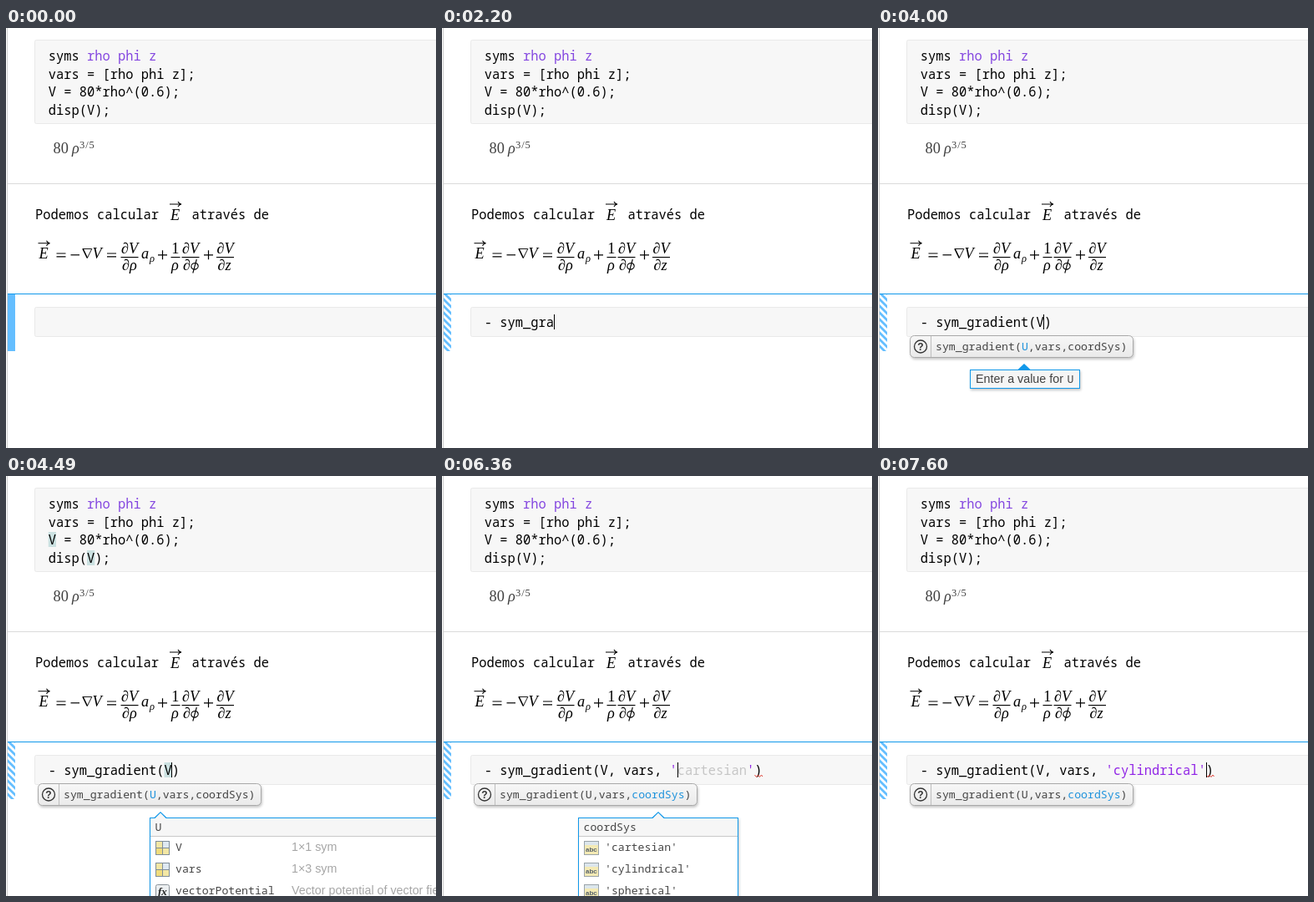
Write an HTML page that moves like this. It is 515 by 503 pixels and loops after 8 s.

```html
<!DOCTYPE html>
<html lang="pt">
<head>
<meta charset="utf-8">
<title>Notebook</title>
<style>
html, body { margin: 0; width: 100%; height: 100%; overflow: hidden; background: #fff; }
svg { display: block; width: 100%; height: 100%; }
text { white-space: pre; }
.code { font: 15.417px "Noto Sans Mono", "DejaVu Sans Mono", monospace; fill: #000; }
.small { font: 13.2px "Noto Sans Mono", "DejaVu Sans Mono", monospace; fill: #454545; }
.ui { font: 14.3px "Liberation Sans", Arial, sans-serif; fill: #404040; }
.math { font: italic 18.3px "Liberation Serif", "Times New Roman", serif; }
.up { font-style: normal; }
.sub { font-size: 12.5px; }
.dim { fill: #a6a6a6; }
.sym { fill: #8447e0; }
.str { fill: #9126e6; }
.ghost { fill: #c6c6c6; }
.arg { fill: #1f93dc; }
.shadow { filter: drop-shadow(1px 2px 1.5px rgba(0,0,0,.22)); }
.mark { mix-blend-mode: multiply; }
</style>
</head>
<body>
<svg viewBox="0 0 515 503" xmlns="http://www.w3.org/2000/svg">
  <defs>
    <pattern id="hatch" width="5.657" height="5.657" patternUnits="userSpaceOnUse" patternTransform="translate(2 319) rotate(45)">
      <rect width="5.657" height="5.657" fill="#fff"/><rect y="2.828" width="5.657" height="2.829" fill="#64beff"/>
    </pattern>
    <linearGradient id="tip" x2="0" y2="1"><stop stop-color="#f7f7f7"/><stop offset="1" stop-color="#eaeaea"/></linearGradient>
  </defs>
  <g id="page"></g>
  <g id="live"></g>
</svg>
<script>
const LOOP = 8000, X0 = 50.75, ADV = 9.25, BLUE = '#1098ea', INK = '#000';
const col = n => X0 + n * ADV;
const $ = id => document.getElementById(id);
const text = (x, y, cls, s) => `<text x="${x}" y="${y}" class="${cls}">${s}</text>`;
const span = (cls, s) => s ? `<tspan class="${cls}">${s}</tspan>` : '';
const rect = (x, y, w, h, fill, more = '') =>
  `<rect x="${x}" y="${y}" width="${w}" height="${h}" fill="${fill}" ${more}/>`;
const path = (d, stroke, w = 1, fill = 'none') =>
  `<path d="${d}" stroke="${stroke}" stroke-width="${w}" fill="${fill}"/>`;

// ---- static page ----
const cell = (y, h) => rect(34.5, y + .5, 500, h, '#f7f7f7', 'rx="2" stroke="#e9e9e9"');
const vec = (x, y) => text(x, y, 'math', 'E') +
  path(`M${x - 1} ${y - 18.5}h14m-4 -3q1 2.4 4 3q-3 .6 -4 3`, INK, 1.1);
const bar = (x, w) => rect(x, 274, w, 1.1, INK);
const equals = x => path(`M${x} 270h11m0 3.8h-11`, INK, 1.2);
const minus = x => path(`M${x} 271.8h10.5`, INK, 1.2);
const plus = x => path(`M${x} 271.8h11m-5.5 -5.5v11`, INK, 1.2);
const nabla = path('M91.8 264.5h11l-5.5 11z', INK, .9) + path('M92.3 264.8l5 10.4', INK, 1.4);
const partial = (x, low) => text(x, 269.5, 'math', '∂V') + text(x + 1, 289.5, 'math', '∂' + low) + bar(x - .5, 21);
const phi = '<ellipse cx="226" cy="285.3" rx="4.2" ry="3.7" fill="none" stroke="#000" stroke-width="1.2" transform="rotate(-18 226 285.3)"/>' +
  path('M228.3 277L223.8 293.5', INK, 1.1);

$('page').innerHTML =
  rect(1, 0, 1, 503, '#cfcfcf') + rect(2, 186, 513, 1, '#dadada') + cell(14, 100) + cell(334, 35) +
  text(X0, 39, 'code', 'syms ' + span('sym', 'rho phi z')) +
  text(X0, 61, 'code', 'vars = [rho phi z];') +
  text(X0, 82, 'code', 'V = 80*rho^(0.6);') +
  text(X0, 104, 'code', 'disp(V);') +
  `<g fill="#404040">${text(56.5, 150, 'math up', '80')}${text(79, 150, 'math', 'ρ')}` +
  `<g letter-spacing=".9">${text(88, 144, 'math up sub', '3/5')}</g></g>` +
  text(35, 229, 'code', 'Podemos calcular') + vec(197, 229.5) + text(222.5, 229, 'code', 'através de') +
  vec(39.5, 276.3) + equals(60.5) + minus(77.5) + nabla + text(103.5, 276, 'math', 'V') + equals(121) +
  partial(138, 'ρ') + text(162, 276, 'math', 'a') + text(172, 280, 'math sub', 'ρ') +
  plus(182) + text(198.3, 269.5, 'math up', '1') + text(198, 289.5, 'math', 'ρ') + bar(197.5, 11) +
  partial(211, '') + phi + plus(237) + partial(252.5, 'z');

// ---- popups ----
const icons = {
  grid: (x, y) => rect(x, y, 17, 17, '#7f8d99') + rect(x + 1, y + 1, 7, 7, '#f3e7a4') + rect(x + 9, y + 1, 7, 7, '#dfe9f2') +
    rect(x + 1, y + 9, 7, 7, '#f0dc7c') + rect(x + 9, y + 9, 7, 7, '#f3e7a4'),
  fx: (x, y) => rect(x + .5, y + .5, 16, 16, '#eceff1', 'rx="2" stroke="#8a9299"') +
    `<text x="${x + 3}" y="${y + 13}" style="font:italic bold 13px 'Liberation Serif',serif" fill="#222">fx</text>`,
  abc: (x, y) => rect(x + .5, y + .5, 17, 16, '#f4eab4', 'stroke="#9aa3a8"') + rect(x + 1, y + 1, 16, 4, '#dce6ec') +
    `<text x="${x + 2}" y="${y + 13}" style="font:bold 8px 'Liberation Sans',sans-serif" fill="#55606a">abc</text>`
};
const row = (x, y, icon, name, info = '') =>
  icons[icon](x, y - 12) + text(x + (icon == 'abc' ? 25 : 24), y, 'small', name) + (info && text(342, y, 'ui dim', info));

const frame = (x, y, w, h, tip, fill) =>
  `<g class="shadow">${rect(x + .5, y + .5, w - 1, h - 1, fill, `stroke="${BLUE}"`)}</g>` +
  path(`M${tip - 8} ${y + .5}L${tip} ${y - 7}L${tip + 8} ${y + .5}z`, 'none', 0, BLUE) +
  (fill == '#fff' ? path(`M${tip - 6.5} ${y + 1}L${tip} ${y - 5.5}L${tip + 6.5} ${y + 1}z`, 'none', 0, '#f6f6f6') : '');

function list(x, w, tip, title, rows) {
  const h = rows.length > 1 ? 120 : 54;
  return frame(x, 409, w, h, tip, '#fff') + rect(x + 1, 410, w - 2, 21, '#f6f6f6') + rect(x + 1, 431, w - 2, 1, '#c9c9c9') +
    text(x + 6.5, 425, 'small" font-weight="600', title) +
    rows.map((r, i) => row(x + 7, 449 + 26 * i, ...r)).join('');
}
const choice = name => ['abc', `'${name}'`];
const popups = {
  complete: () => `<g class="shadow">${rect(36.5, 368.5, 191, 29, '#fff', `stroke="${BLUE}"`)}</g>` + row(45, 388, 'fx', 'sym_gradient'),
  hint: () => frame(110, 409, 132, 23, 175, '#f5f5f5') + text(117, 425, 'ui', 'Enter a value for ') + text(226.5, 425, 'small', 'U'),
  vars: () => list(172, 400, 185, 'U', [['grid', 'V', '1×1 sym'], ['grid', 'vars', '1×3 sym'],
    ['fx', 'vectorPotential', 'Vector potential of vector field']]),
  coords: () => list(163, 192, 259, 'coordSys', ['cartesian', 'cylindrical', 'spherical'].map(choice)),
  one: () => list(163, 192, 259, 'coordSys', [choice('cylindrical')])
};
const signature = arg => {
  const args = ['U', 'vars', 'coordSys'].map(a => a == arg ? span('arg', a) : a).join(',');
  return `<g class="shadow">${rect(38.5, 368.5, 267, 26, 'url(#tip)', 'rx="5" stroke="#a9a9a9"')}</g>` +
    rect(63, 369, 1, 25, '#bdbdbd') + '<circle cx="51" cy="381.5" r="7.5" fill="none" stroke="#333" stroke-width="1.3"/>' +
    `<text x="51" y="386" text-anchor="middle" style="font:bold 12px 'Liberation Sans',sans-serif" fill="#333">?</text>` +
    text(69, 386, 'small', `sym_gradient(${args})`);
};

// ---- timeline: each step patches the state ----
const call = 'sym_gradient(';
const steps = [
  [0, { code: '', str: '', ghost: '', close: '', end: '', on: 0, edit: 0, pop: '', arg: '', err: 0, mark: 0 }],
  [130, { on: 1 }],
  [650, { code: '-', edit: 1 }],
  ...[950, 1080, 1260, 1470, 1750, 1970, 2130, 2200].map((t, i) => [t, { code: '- sym_gra'.slice(0, i + 2) }]),
  [2490, { code: '- sym_gradient', pop: 'complete' }],
  [2770, { pop: '' }],
  [2920, { code: '- ' + call, end: ')' }],
  [3080, { pop: 'hint', arg: 'U' }],
  [3470, { on: 0 }],
  [4000, { code: `- ${call}V`, on: 1 }],
  [4440, { pop: 'vars', mark: 1 }],
  ...[4525, 4610, 4695, 4780, 4865, 4950, 5120, 5230].map((t, i) =>
    [t, { code: `- ${call}V` + ', vars, '.slice(0, i + 1), mark: 0 }]),
  [5450, { pop: 'coords', arg: 'coordSys', ghost: "'cartesian'" }],
  [5830, { on: 0 }],
  [6110, { on: 1, str: "'", ghost: '', err: 1 }],
  [6190, { close: "'" }],
  [6360, { ghost: 'cartesian' }],
  [6610, { str: "'c", ghost: '' }],
  [6730, { str: "'cy" }],
  [6950, { ghost: 'lindrical', pop: 'one' }],
  [7540, { str: "'cylindrical", ghost: '', pop: '' }],
  [7600, { str: "'cylindrical'", close: '' }]
];

function draw(s) {
  const caret = s.code.length + s.str.length;
  const paren = col(caret + s.ghost.length + s.close.length);
  const marks = [[0, 67], [5, 89], [15, 343]].map(([n, y]) => rect(col(n), y, ADV, 18, '#d2e9e9', 'class="mark"')).join('');
  return rect(2, 319, 9, 68, s.edit ? 'url(#hatch)' : '#64beff') + rect(2, 318, 513, 1, BLUE) +
    (s.mark ? marks : '') +
    text(X0, 358, 'code', s.code + span('str', s.str) + span('ghost', s.ghost) + span('str', s.close) + s.end) +
    (s.err ? path(`M${paren} 358l2 2.5l2 -2.5l2 2.5l2 -2.5l1.5 2`, '#e0453a', 1) : '') +
    (s.on ? rect(Math.floor(col(caret)), 343, 1, 18, '#000') : '') +
    (s.arg ? signature(s.arg) : '') + (s.pop ? popups[s.pop]() : '');
}

let shown = -1;
const start = performance.now();
function tick(now) {
  const t = Math.max(0, now - start) % LOOP;
  const n = steps.filter(s => s[0] <= t).length;
  if (n !== shown) {
    $('live').innerHTML = draw(Object.assign({}, ...steps.slice(0, n).map(s => s[1])));
    shown = n;
  }
  requestAnimationFrame(tick);
}
tick(start);
</script>
</body>
</html>
```
